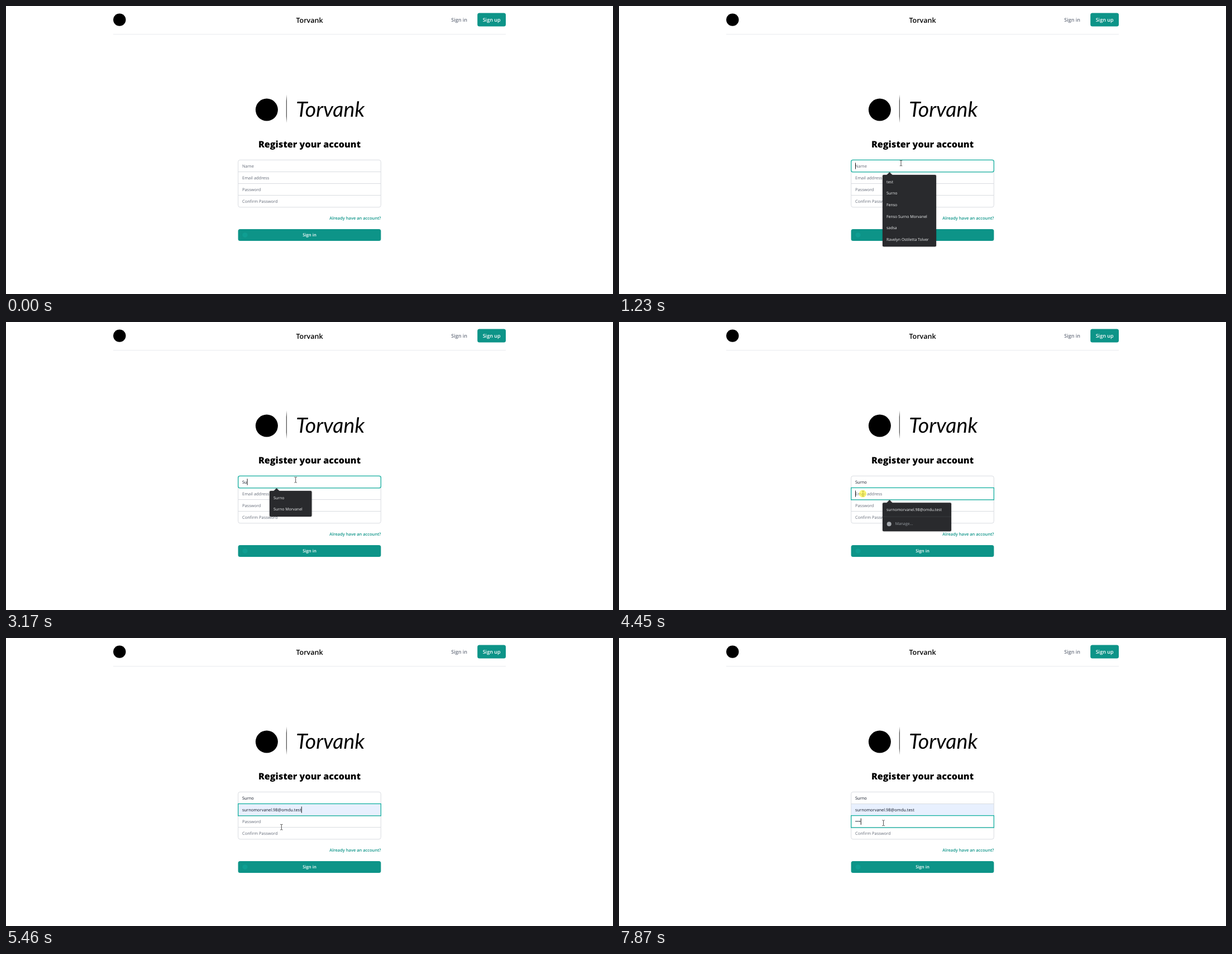
An HTML page that plays this animation: 1087 px wide and 515 px high, repeating every 8 s.

```html
<!DOCTYPE html>
<html lang="en">
<head>
<meta charset="utf-8">
<title>Register</title>
<style>
  html, body { margin: 0; width: 100%; height: 100%; overflow: hidden; background: #fff; }
  svg { display: block; width: 100%; height: 100%; }
  text { font: 7.45px "Open Sans", "Noto Sans", sans-serif; text-rendering: geometricPrecision; white-space: pre; }
  .mid { text-anchor: middle; }
  .end { text-anchor: end; }
  .semi { font-weight: 600; }
  .brand { font-size: 12.5px; font-weight: 600; }
  .nav { font-size: 9px; font-weight: 600; fill: #6b7280; }
  .link { font-size: 7.5px; }
  .submit { font-size: 7.7px; }
  .white { fill: #fff; }
  .wordmark { font: italic 37.6px Lato, sans-serif; }
  .heading { font-size: 16.15px; font-weight: 800; }
  .teal { fill: #0d9488; }
  .border { fill: none; stroke: #d9dce1; }
  #popup { filter: drop-shadow(0 .5px 1px rgba(0, 0, 0, .35)); }
  #popup text { font-size: 6.96px; fill: #f1f3f4; }
  #popup .manage { fill: #9aa0a6; }
</style>
</head>
<body>
<svg viewBox="0 0 1087 515">
  <circle cx="203.3" cy="24.6" r="11.2"/>
  <text class="brand mid" x="543.5" y="30.3">Torvank</text>
  <text class="nav mid" x="811.7" y="28">Sign in</text>
  <rect class="teal" x="844.2" y="12.5" width="50.8" height="24" rx="3.5"/>
  <text class="nav white mid" x="869.6" y="28">Sign up</text>
  <path d="M192 50.5H895" stroke="#e9ebee"/>

  <circle cx="466.9" cy="185.6" r="20"/>
  <path d="M502.3 158.5L502.8 170V197L502.3 209L501.8 197V170Z" fill="#222"/>
  <text class="wordmark" x="519.2" y="198">Torvank</text>
  <text class="heading mid" x="543.5" y="253.3">Register your account</text>

  <rect id="autofill" x="416" y="296.5" width="255" height="21" fill="#e8f0fe"/>
  <rect class="border" x="415.7" y="275.3" width="255.6" height="84.5" rx="3.5"/>
  <path class="border" d="M416 296.5H671M416 317.5H671M416 338.5H671"/>
  <rect id="ring" x="415.7" width="255.7" height="21.5" fill="none" stroke="#14b0a0" stroke-width="1.3"/>
  <g id="fields"></g>
  <rect id="caret" width=".9" height="11.4"/>

  <text class="teal semi link end" x="671.5" y="382.1">Already have an account?</text>
  <rect class="teal" x="415.6" y="399" width="255.8" height="21" rx="3.5"/>
  <circle cx="428" cy="409.5" r="4.6" fill="#0f9e92"/>
  <text class="semi submit white mid" x="543.5" y="412.2">Sign in</text>

  <g id="popup"></g>
  <g id="cursor">
    <path id="beam" d="M-2.2 -4.8H-.6L0 -4.2L.6 -4.8H2.2M0 -4.2V4.2M-2.2 4.8H-.6L0 4.2L.6 4.8H2.2"
      fill="none" stroke="#222" stroke-width=".8"/>
    <path id="arrow" d="M0 0V9.6L2.2 7.5L3.6 10.8L5.1 10.2L3.7 7H6.8Z"
      fill="#fff" stroke="#000" stroke-width=".6"/>
    <circle id="press" cx="-.5" r="6.6" fill="#fff628" opacity=".62"/>
  </g>
</svg>
<script>
const LOOP = 8000, ROW = 21.13, TEXT_X = 423;
const $ = id => document.getElementById(id);

const EMAIL = 'surnomorvanel.98@omdu.test';
const LABELS = ['Name', 'Email address', 'Password', 'Confirm Password'];
const POPUPS = {
  all: { width: 96, items: ['test', 'Surno', 'Fenso', 'Fenso Surno Morvanel', 'sadsa', 'Ravelyn Ostiletta Tolver'] },
  some: { width: 75.5, items: ['Surno', 'sadsa', 'Surno Morvanel', 'sasda'] },
  few: { width: 75.5, items: ['Surno', 'Surno Morvanel'] },
  email: { width: 123, items: [EMAIL], manage: true },
};

// Each entry changes the state from its time onward.
const EVENTS = [
  [0, { focus: -1, caret: false, press: false, popup: '', hover: false, name: '', email: '', dots: 0 }],
  [970, { press: true }],
  [1040, { focus: 0, caret: true }],
  [1100, { popup: 'all' }],
  [1230, { press: false }],
  [1560, { caret: false }],
  [2100, { caret: true }],
  [2630, { caret: false }],
  [2900, { name: 'S', caret: true, popup: 'some' }],
  [3110, { name: 'Su' }],
  [3170, { popup: 'few' }],
  [3240, { name: 'Sur' }],
  [3370, { name: 'Surn' }],
  [3440, { name: 'Surno' }],
  [3970, { caret: false }],
  [4380, { press: true, popup: '' }],
  [4450, { focus: 1, caret: true, popup: 'email' }],
  [4520, { press: false }],
  [4930, { hover: true, email: EMAIL, caret: false }],
  [5330, { press: true }],
  [5400, { popup: '', hover: false, caret: true }],
  [5460, { press: false }],
  [6010, { caret: false }],
  [6210, { press: true, focus: 2, caret: true }],
  [6280, { press: false }],
  [6740, { caret: false }],
  [7270, { caret: true }],
  [7400, { dots: 1 }],
  [7540, { dots: 2 }],
  [7870, { dots: 3 }],
];

// Pointer moves: start time, number of steps, destination.
const START = [1033, 512], STEP = 70;
const MOVES = [
  [130, 12, [505, 281]],
  [1960, 3, [518.7, 282.3]],
  [4040, 5, [437, 307]],
  [4720, 6, [493.3, 338.2]],
  [5670, 3, [472.5, 330]],
  [6810, 1, [473.5, 330.7]],
];

const ease = p => (1 - Math.cos(Math.PI * p)) / 2;

function pointerAt(t) {
  let pos = START;
  for (const [start, steps, goal] of MOVES) {
    if (t < start) break;
    const p = ease(Math.min(1, (Math.floor((t - start) / STEP) + 1) / steps));
    pos = pos.map((v, i) => v + (goal[i] - v) * p);
  }
  return pos;
}

const stateAt = t => Object.assign({}, ...EVENTS.filter(e => e[0] <= t).map(e => e[1]));
const baseline = row => 288.6 + row * ROW;
const label = (x, y, str, cls = '') => `<text x="${x}" y="${y}" class="${cls}">${str}</text>`;
const show = (id, on) => { $(id).style.display = on ? '' : 'none'; };

$('fields').innerHTML = LABELS.map((str, i) => label(TEXT_X, baseline(i), str)).join('');
const fields = [...$('fields').children];

function popupMarkup(key, row, hover) {
  if (!key) return '';
  const { width, items, manage } = POPUPS[key];
  const x = 472, y = 302 + row * ROW, height = manage ? 51 : 5 + items.length * 20.55;
  let out = `<path d="M479 ${y + .5}l5.5 -5.3l5.5 5.3z" fill="#292a2d"/>
    <rect x="${x}" y="${y}" width="${width}" height="${height}" rx="2" fill="#292a2d"/>`;
  if (hover) out += `<rect x="${x}" y="${y + 2.3}" width="${width}" height="20.5" fill="#3f4145"/>`;
  out += items.map((str, i) => label(479, y + 14.8 + i * 20.57, str)).join('');
  if (manage) out += `<path d="M${x} ${y + 25}h${width}" stroke="#3f4145" stroke-width=".7"/>
    <circle cx="483.7" cy="${y + 38}" r="4" fill="#a5a9ae"/>` + label(494.7, y + 40.3, 'Manage...', 'manage');
  return out;
}

let lastKey = '';
function drawForm(s) {
  const key = JSON.stringify(s);
  if (key === lastKey) return;
  lastKey = key;

  const values = [s.name, s.email, '•'.repeat(s.dots), ''];
  fields.forEach((el, i) => {
    el.textContent = values[i] || LABELS[i];
    el.style.fill = values[i] ? '#111827' : '#646b78';
    el.style.fontSize = i === 2 && s.dots ? '8.7px' : '';
  });

  show('autofill', s.email);
  show('ring', s.focus >= 0);
  $('ring').setAttribute('y', 275.3 + s.focus * ROW);
  $('ring').setAttribute('rx', s.focus === 0 ? 3 : 0);

  show('caret', s.caret);
  if (s.caret) {
    const width = values[s.focus] ? fields[s.focus].getComputedTextLength() : 0;
    $('caret').setAttribute('x', TEXT_X + width);
    $('caret').setAttribute('y', 280.3 + s.focus * ROW);
  }

  $('popup').innerHTML = popupMarkup(s.popup, s.focus, s.hover);
  show('press', s.press);
}

function drawPointer(t, s) {
  const [x, y] = pointerAt(t);
  const overForm = x > 416 && x < 671 && y > 275 && y < 360;
  const useBeam = overForm && !s.hover;
  show('cursor', t >= MOVES[0][0]);
  show('beam', useBeam);
  show('arrow', !useBeam);
  $('cursor').setAttribute('transform', `translate(${x} ${y})`);
}

const origin = performance.now();
function frame() {
  const t = (performance.now() - origin) % LOOP;
  const state = stateAt(t);
  drawForm(state);
  drawPointer(t, state);
  requestAnimationFrame(frame);
}
frame();
</script>
</body>
</html>
```
